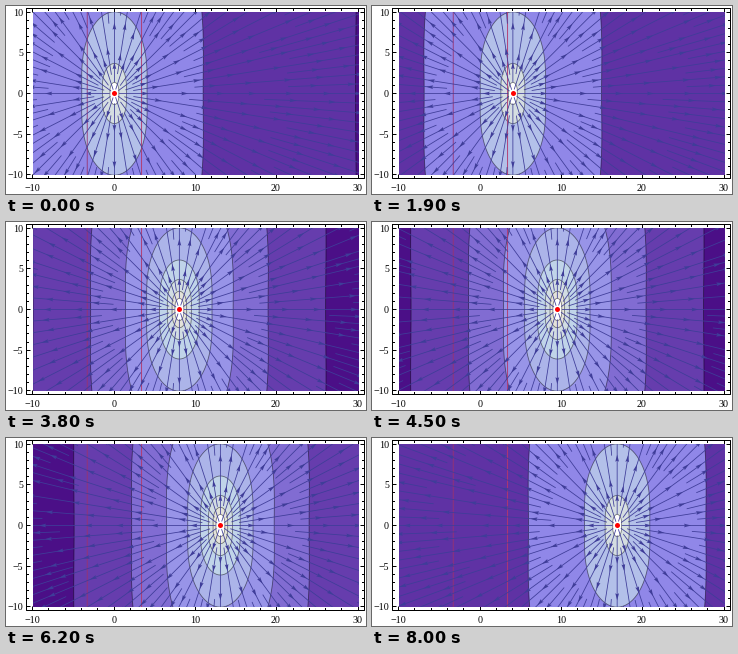
A matplotlib script that plays this animation: 360x188 px, repeating every 8100 ms.

```python
import numpy as np
import matplotlib.pyplot as plt
from matplotlib.animation import FuncAnimation
from matplotlib.collections import LineCollection, PolyCollection

WIDTH, HEIGHT, DPI = 360, 188, 100
FRAMES, INTERVAL = 81, 100
PX = 72 / DPI
SPEED = 0.84
TIME_STEP = 0.25
LEFT, RIGHT, TOP, BOTTOM = 27, 352.6, 6.1, 168.9
BOX = (20.5, 358.5, 2.5, 172.5)

STREAM = (0.247, 0.24, 0.6)
GRADIENT = np.array([
    [0.293, 0.057, 0.529],
    [0.564, 0.528, 0.909],
    [0.763, 0.847, 0.914],
    [0.941, 0.907, 0.834],
])

plt.rcParams["font.family"] = "Liberation Serif"
fig = plt.figure(figsize=(WIDTH / DPI, HEIGHT / DPI), dpi=DPI, facecolor="white")


def shade(t):
    stops = np.linspace(0, 1, len(GRADIENT))
    return tuple(np.interp(t, stops, channel) for channel in GRADIENT.T)


def pixel_center(value):
    return np.floor(value) + 0.5


def draw_frame():
    page = fig.add_axes([0, 0, 1, 1])
    page.set(xlim=(0, WIDTH), ylim=(HEIGHT, 0))
    page.axis("off")
    x0, x1, y0, y1 = BOX
    lines = [[(x0, y0), (x1, y0), (x1, y1), (x0, y1), (x0, y0)]]
    for value in range(-10, 31, 2):
        x = pixel_center(LEFT + (value + 10) / 40 * (RIGHT - LEFT) - 0.4)
        major = value % 10 == 0
        size = 4 if major else 2.5
        lines += [[(x, y0), (x, y0 + size)], [(x, y1), (x, y1 - size)]]
        if major:
            page.text(x - 0.6, 185.2, str(value).replace("-", "\u2212"),
                      size=10 * PX, ha="center", va="baseline")
    for value in range(-10, 11):
        y = pixel_center(BOTTOM - (value + 10) / 20 * (BOTTOM - TOP))
        major = value % 5 == 0
        size = 4 if major else 2.5
        lines += [[(x0, y), (x0 + size, y)], [(x1, y), (x1 - size, y)]]
        if major:
            page.text(17, y + 3.2, str(value).replace("-", "\u2212"),
                      size=10 * PX, ha="right", va="baseline")
    page.add_collection(LineCollection(lines, colors="black", linewidths=PX, snap=False))


def contour(level):
    """Closed curve where log|E| of the moving charge equals level."""
    angle = np.linspace(0, 2 * np.pi, 181)
    squash = (1 - SPEED**2 * np.sin(angle) ** 2) ** 1.5
    radius = np.exp(-level / 2) * np.sqrt((1 - SPEED**2) / squash)
    return np.column_stack([radius * np.cos(angle), radius * np.sin(angle)])


def contour_set(levels, step, tone):
    fills = [shade(tone(n + step / 2)) for n in levels[:-1]] + [(1, 1, 1)]
    return [contour(n) for n in levels], fills, shade(tone(levels[0] - step / 2))


def build_streams():
    """Radial lines, with extra ones filling the gaps farther out."""
    rng = np.random.default_rng(5)
    families = [(10, 0, 0.5), (10, 0.5, 1.2), (20, 0.5, 2.4), (40, 0.5, 9), (80, 0.5, 20)]
    arrow = np.array([(0.42, 0), (-0.45, 0.23), (-0.32, 0), (-0.45, -0.23)])
    rays, heads = [], []
    for count, shift, start in families:
        for k in range(count):
            angle = 2 * np.pi * (k + shift) / count
            c, s = np.cos(angle), np.sin(angle)
            inner = start * rng.uniform(0.9, 1.2)
            rays.append([(inner * c, inner * s), (34 * c, 34 * s)])
            r = inner + rng.uniform(1.8, 3.6)
            while r < 32:
                heads.append(arrow @ np.array([[c, s], [-s, c]]) + (r * c, r * s))
                r += rng.uniform(3.8, 5.8)
    return np.array(rays), np.array(heads)


draw_frame()
field = fig.add_axes([LEFT / WIDTH, 1 - BOTTOM / HEIGHT,
                      (RIGHT - LEFT) / WIDTH, (BOTTOM - TOP) / HEIGHT])
field.set(xlim=(-10, 30), ylim=(-10, 10), xticks=[], yticks=[])
field.spines[:].set_visible(False)

COARSE = contour_set(range(-8, 1, 2), 2, lambda mid: 0.333 + 0.117 * (mid + 5))
FINE = contour_set(range(-7, 1), 1, lambda mid: 0.13 * (mid + 7.5))
RAYS, HEADS = build_streams()

regions = PolyCollection([], edgecolors=(0, 0, 0, 0.5), linewidths=0.8 * PX, zorder=1)
rays = LineCollection([], colors=[STREAM], linewidths=0.8 * PX, zorder=3, snap=False)
heads = PolyCollection([], facecolors=[STREAM], edgecolors="none", zorder=4)
for artist in (regions, rays, heads):
    field.add_collection(artist, autolim=False)
field.axvline(-10 / 3, color=(0.6, 0.2, 0.44, 0.85), lw=PX, zorder=2, snap=False)
field.axvline(10 / 3, color=(0.7, 0.22, 0.42, 0.9), lw=PX, zorder=2, snap=False)
charge, = field.plot([], [], "o", color="red", ms=5 * PX, mew=0, zorder=5)


def update(frame):
    x = SPEED * TIME_STEP * frame
    outlines, fills, backdrop = FINE if abs(x - 10) < 4.5 else COARSE
    offset = np.array([x, 0])
    field.set_facecolor(backdrop)
    regions.set_verts([outline + offset for outline in outlines])
    regions.set_facecolor(fills)
    rays.set_segments(RAYS + offset)
    heads.set_verts(HEADS + offset)
    charge.set_data([x], [0])
    return regions, rays, heads, charge


animation = FuncAnimation(fig, update, frames=FRAMES, interval=INTERVAL,
                          repeat=True, repeat_delay=0, blit=False)
plt.show()
```
